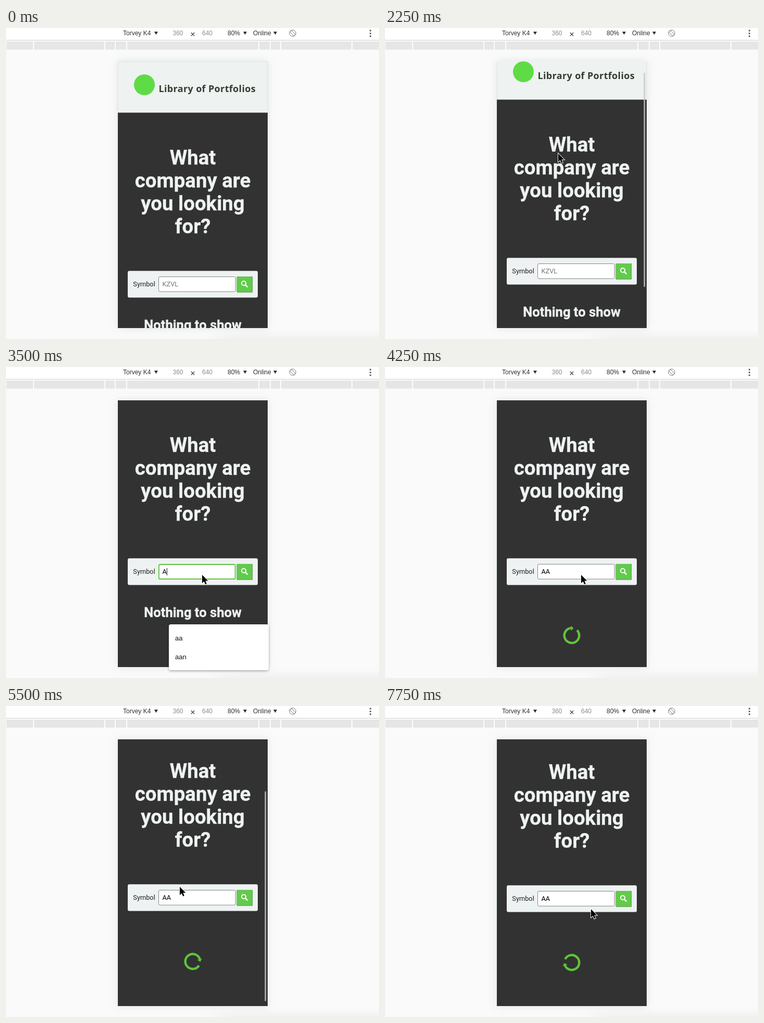
An HTML page that plays this animation: 717 by 597 pixels, repeating every 8000 ms.

```html
<!DOCTYPE html>
<html lang="en">
<head>
<meta charset="utf-8">
<title>Stock search</title>
<style>
  html, body { margin: 0; width: 100%; height: 100%; overflow: hidden; background: #fafafa; }
  svg { display: block; }
  .bar { font: 12px "Liberation Sans", Arial, sans-serif; fill: #303030; }
  .dim { fill: #8c8c8c; }
  .title { font: 600 18px "Noto Sans", sans-serif; letter-spacing: .35px; fill: #333d30; }
  .head, .sub { font: 700 38.4px Roboto, sans-serif; fill: #eef2f2; stroke: #eef2f2; stroke-width: .35px; text-anchor: middle; }
  .sub { font-size: 25.6px; }
  .form { font: 12.8px Roboto, sans-serif; fill: #222; }
  .item { font: 13px "Liberation Sans", Arial, sans-serif; fill: #111; }
</style>
</head>
<body>
<svg width="717" height="597" viewBox="0 0 717 597">
  <defs>
    <clipPath id="screen"><rect x="215" y="64" width="288" height="512"/></clipPath>
    <filter id="glow" x="-20%" y="-20%" width="140%" height="140%">
      <feDropShadow dx="0" dy="0" stdDeviation="8" flood-color="#6f8f87" flood-opacity=".2"/>
    </filter>
    <filter id="lift" x="-10%" y="-15%" width="120%" height="135%">
      <feDropShadow dx="0" dy="1.5" stdDeviation="2" flood-color="#000" flood-opacity=".35"/>
    </filter>
    <filter id="soft" x="-20%" y="-100%" width="140%" height="300%">
      <feGaussianBlur stdDeviation="18 7"/>
    </filter>
    <path id="drop" d="M0 0h7l-3.5 6z" fill="#303030"/>
  </defs>

  <rect width="717" height="597" fill="#fafafa"/>
  <rect x="405" y="590" width="380" height="40" fill="#eef0ef" filter="url(#soft)"/>

  <rect width="717" height="23" fill="#fff"/>
  <rect y="23" width="717" height="1" fill="#cdcdcd"/>
  <rect y="24" width="717" height="18" fill="#fdfdfd"/>
  <g id="ruler" fill="#e6e6e6"></g>
  <g class="bar">
    <text x="225" y="14">Torvey K4</text>
    <text class="dim" x="320.5" y="14">360</text>
    <text class="dim" x="377" y="14">640</text>
    <text x="426" y="14">80%</text>
    <text x="475" y="14">Online</text>
  </g>
  <use href="#drop" x="285" y="7"/>
  <use href="#drop" x="456" y="7"/>
  <use href="#drop" x="514" y="7"/>
  <path d="M355.8 8.8l6.4 6.4m0-6.4l-6.4 6.4" stroke="#444" stroke-width="1.3"/>
  <g fill="none" stroke="#6e6e6e" stroke-width=".9">
    <circle cx="551" cy="10" r="6.2"/>
    <rect x="548.8" y="4.6" width="4.4" height="10.8" transform="rotate(-45 551 10)"/>
  </g>
  <g fill="#666">
    <circle cx="700.5" cy="5" r="1.7"/><circle cx="700.5" cy="10.4" r="1.7"/><circle cx="700.5" cy="15.8" r="1.7"/>
  </g>

  <rect x="215" y="64" width="288" height="512" fill="#333" filter="url(#glow)"/>
  <g clip-path="url(#screen)">
    <g id="page">
      <rect x="215" y="64" width="288" height="98.5" fill="#eef2f1"/>
      <path d="M215.5 162V64.5H502.5V162" fill="none" stroke="#dfe4e3"/>
      <circle cx="266" cy="109" r="20" fill="#5fdb45"/>
      <text class="title" x="293.5" y="122.5">Library of Portfolios</text>
      <g id="lines" class="head"></g>

      <rect x="234" y="466.3" width="250" height="51.2" rx="3" fill="#eef2f2"/>
      <text class="form" x="244.3" y="496.3">Symbol</text>
      <rect id="field" fill="#fff"/>
      <text id="value" class="form" x="300.5" y="496.3"></text>
      <path id="caret" d="M0 485v14" stroke="#111" stroke-width="1"/>
      <rect x="443.5" y="477" width="30.5" height="30.5" fill="#61cb4b"/>
      <path d="M443.9 507V477.4H474" fill="none" stroke="#79b86b" stroke-width=".8"/>
      <path d="M444 507.1H473.6V477.5" fill="none" stroke="#5f8f56" stroke-width=".8"/>
      <g fill="none" stroke="#fff" stroke-width="2">
        <circle cx="457" cy="490" r="4.1"/>
        <path d="M460 493l3.6 3.6" stroke-width="2.5" stroke-linecap="round"/>
      </g>

      <text id="none" class="sub" x="359" y="579.3">Nothing to show</text>
      <g id="spin">
        <path id="ring" fill="none" stroke="#5fc43a" stroke-width="4.4"/>
        <path d="M17.8 -5.5L14.5 .5L8.6 -3.2z" fill="#5fc43a"/>
      </g>
    </g>
    <rect id="thumb" x="497.3" width="2.8" rx="1.4" fill="#c5c5c5" fill-opacity=".81"/>
  </g>

  <g id="popup">
    <rect x="313" y="494" width="192" height="88" rx="4" fill="#fff" filter="url(#lift)"/>
    <text class="item" x="325" y="525">aa</text>
    <text class="item" x="325" y="561">aan</text>
  </g>
  <path id="mouse" d="M0 0V16L3.7 12.6L6.2 18.3L8.8 17.2L6.4 11.6H11.4z" fill="#000" stroke="#fff" stroke-width="1.8" paint-order="stroke"/>
</svg>
<script>
const LOOP = 8000, STEP = 250;
const el = id => document.getElementById(id);
const show = (id, on) => el(id).setAttribute("visibility", on ? "visible" : "hidden");
const set = (id, attrs) => { for (const k in attrs) el(id).setAttribute(k, attrs[k]); };
const within = (t, a, b) => t >= a && t < b;

// Keys are [time, value, ...]; values are joined by straight lines.
function tween(keys, t) {
  let i = 0;
  while (i < keys.length - 2 && t >= keys[i + 1][0]) i++;
  const a = keys[i], b = keys[i + 1];
  const u = Math.min(1, Math.max(0, (t - a[0]) / (b[0] - a[0])));
  return a.slice(1).map((v, n) => v + (b[n + 1] - v) * u);
}

const scrollKeys = [[1750, 0], [2000, 4], [2250, 25], [2500, 68], [2750, 99],
  [5000, 99], [5250, 112], [5500, 124], [6250, 124], [6500, 137], [6750, 122]];
const mouseKeys = [[250, 443, 384], [500, 392, 302], [750, 340, 228], [1000, 315, 199],
  [1250, 315, 199], [2000, 333, 241], [2250, 333, 241], [2500, 329, 272], [2750, 326, 300],
  [3250, 377, 399], [4250, 377, 399], [4750, 334, 347], [6250, 334, 347],
  [6750, 396, 390], [7500, 396, 390]];
const spinKeys = [[4250, -78], [5000, 185], [5500, 360], [7750, 1254], [8000, 1353]];

const marks = [0, 53, 190, 210, 232, 486, 508, 528, 665, 718];
el("ruler").innerHTML = marks.slice(1).map((x, i) =>
  `<rect x="${marks[i] + 1}" y="26" width="${x - marks[i] - 2}" height="15.5"/>`).join("");
el("lines").innerHTML = ["What", "company are", "you looking", "for?"].map((s, i) =>
  `<text x="359" y="${262 + i * 44}">${s}</text>`).join("");

const polar = deg => [Math.cos(deg * Math.PI / 180) * 14.3, Math.sin(deg * Math.PI / 180) * 14.3].join(" ");
set("ring", { d: `M${polar(33)}A14.3 14.3 0 1 1 ${polar(-18)}` });

function typed(t) {
  if (t < 3500) return "";
  if (t < 3750 || t === 7000) return "A";
  return "AA";
}

function draw(t) {
  const [scroll] = tween(scrollKeys, t);
  const [mx, my] = tween(mouseKeys, t);
  const loading = t >= 4250;
  const focus = within(t, 3250, 4250) || within(t, 6750, 7500);
  const text = typed(t);

  set("page", { transform: `translate(0 ${-scroll})` });
  set("mouse", { transform: `translate(${mx} ${my})` });
  show("mouse", t >= 250);

  set("field", focus
    ? { x: 294, y: 478, width: 146.6, height: 28, rx: 2, stroke: "#61c443", "stroke-width": 1.8 }
    : { x: 293.5, y: 477.5, width: 147.6, height: 28.6, rx: 2.5, stroke: "#858585", "stroke-width": 1 });
  el("value").textContent = text || "KZVL";
  el("value").style.fill = text ? "#000" : "#757575";
  show("caret", focus);
  set("caret", { transform: `translate(${301 + text.length * 8.4} 0)` });

  show("none", !loading);
  show("spin", loading);
  set("spin", { transform: `translate(359 614.4) rotate(${tween(spinKeys, t)[0]})` });

  const height = loading ? 645 : 633;
  const top = 66 + scroll * 508 / height;
  set("thumb", { y: top, height: Math.min(loading ? 403 : 411, 574 - top) });
  show("thumb", within(t, 2000, 3000) || within(t, 5250, 6000) || within(t, 6500, 7000));
  show("popup", within(t, 3500, 4250) || within(t, 7000, 7500));
}

function tick() {
  const t = performance.now() % LOOP;
  draw(Math.floor(t / STEP) * STEP);
  requestAnimationFrame(tick);
}
tick();
</script>
</body>
</html>
```
